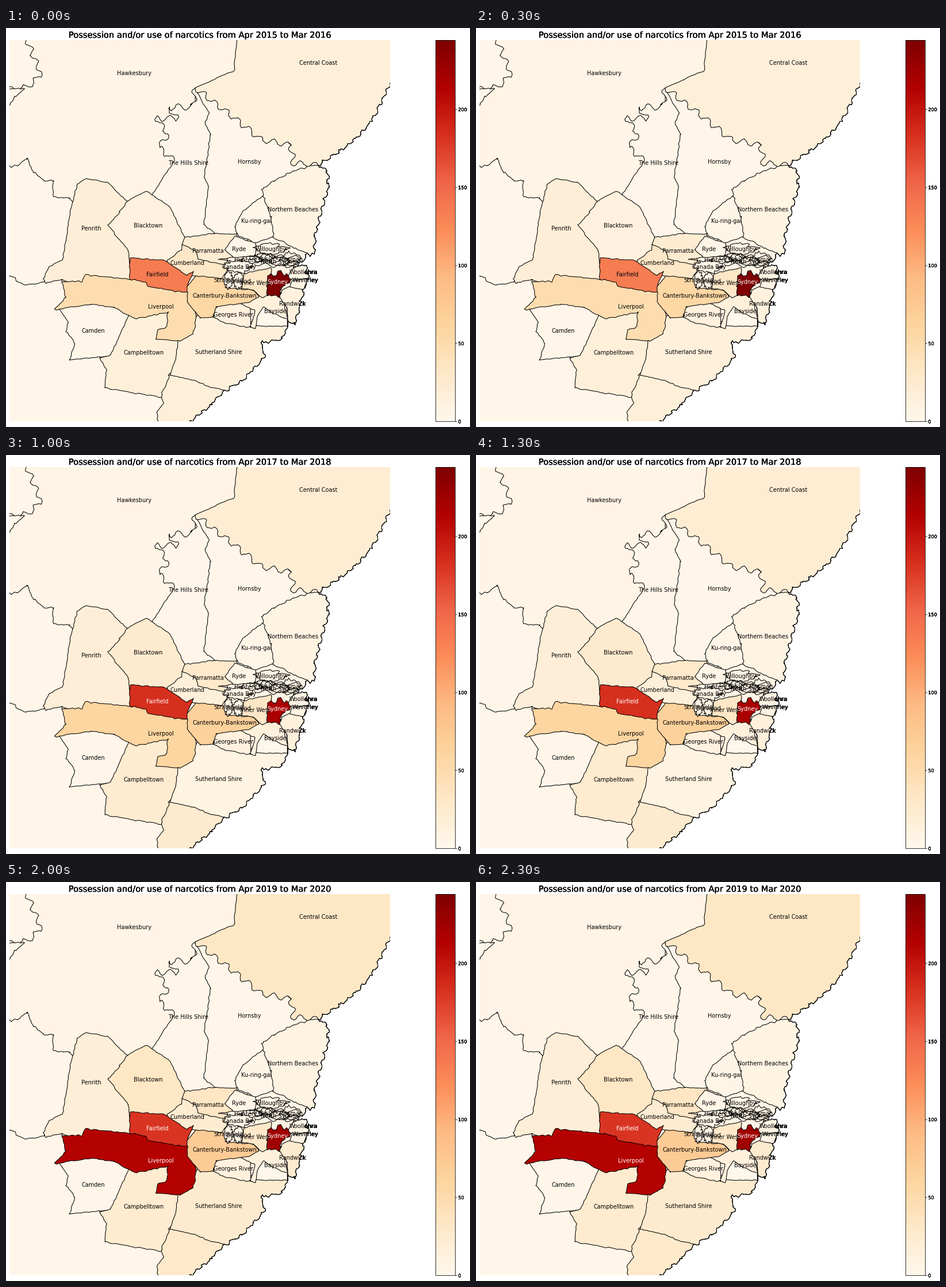
A matplotlib script that plays this animation: 807 by 694 pixels, repeating every 2500 ms.

```python
import numpy as np
import matplotlib.pyplot as plt
from matplotlib.animation import FuncAnimation
from matplotlib.cm import ScalarMappable
from matplotlib.colors import Normalize
from matplotlib.patches import Polygon
from matplotlib.patheffects import Normal

W, H, DPI = 807, 694, 100
PT = 72 / DPI  # points per pixel
TOP, BOTTOM, LEFT, RIGHT = 21, 684, 6, 668
HEAVY = [Normal()] * 4
FIRST_YEAR, YEARS = 2015, 5

plt.rcParams["font.family"] = "DejaVu Sans"
rng = np.random.default_rng(12)
norm = Normalize(0, 244.3)
cmap = plt.get_cmap("OrRd")

fig = plt.figure(figsize=(W / DPI, H / DPI), dpi=DPI, facecolor="white")


def pixel_axes(x0, x1):
    return fig.add_axes([x0 / W, 1 - BOTTOM / H, (x1 - x0) / W, (BOTTOM - TOP) / H])


ax = pixel_axes(LEFT, RIGHT)
ax.set_xlim(LEFT, RIGHT)
ax.set_ylim(BOTTOM, TOP)
ax.axis("off")
places = []


def path(*flat, jitter=0.6, step=5, wave=0, period=25):
    """Line through a few key points, roughened by noise and an optional meander."""
    keys = np.array(flat, float).reshape(-1, 2)
    dist = np.append(0, np.cumsum(np.hypot(*np.diff(keys, axis=0).T)))
    total = dist[-1]
    s = np.union1d(np.linspace(0, total, max(2, round(total / step))), dist)
    pts = np.column_stack([np.interp(s, dist, axis) for axis in keys.T])
    dx, dy = np.gradient(pts, axis=0).T
    normal = np.column_stack([-dy, dx]) / np.maximum(np.hypot(dx, dy), 1e-6)[:, None]
    turns = max(1, round(total / period))
    pts += normal * wave * np.sin(2 * np.pi * turns * s / total)[:, None]
    pts[1:-1] += rng.normal(0, jitter, (len(pts) - 2, 2))
    return pts


def shore(*flat):
    return path(*flat, jitter=1, step=3, wave=1.8, period=17)


def river(*flat, wave=5):
    return path(*flat, wave=wave, step=3)


def islet(x, y, rx, ry):
    angle = np.linspace(0, 2 * np.pi, 44)
    r = 1 + rng.normal(0, 0.13, len(angle))
    return np.column_stack([x + rx * r * np.cos(angle), y + ry * r * np.sin(angle)])


def label(name, x, y, **style):
    return ax.text(x, y + 3.7, name, ha="center", va="baseline",
                   fontsize=9.78 * PT, **style)


def place(name, spot, level, *paths):
    shape = Polygon(np.vstack(paths), closed=True, edgecolor="black",
                    linewidth=1.05 * PT, joinstyle="round", zorder=1)
    ax.add_patch(shape)
    text = None
    if name:
        label(name, *spot, zorder=0.5, path_effects=HEAVY)  # shows only over the sea
        text = label(name, *spot, zorder=3)
    places.append((shape, text, np.broadcast_to(level, YEARS)))


# Coast from north to south
north = shore(690, 85, 668, 97, 652, 130, 633, 165, 608, 193, 580, 214, 543, 239)
beaches = shore(543, 239, 559, 248, 561, 276, 549, 315, 537, 362, 536, 394, 524, 392)
head = shore(524, 392, 515, 406, 500, 417, 521, 412, 525, 436)
east = shore(525, 436, 517, 457, 511, 485, 502, 516, 490, 507)
south = shore(490, 519, 480, 541, 444, 547, 450, 572, 411, 613, 381, 630)
far_south = shore(381, 630, 357, 654, 310, 694)
coast = np.vstack([north, beaches, head, east, south, far_south])
ax.plot(*coast.T, color="black", lw=1.2 * PT, zorder=0.5, path_effects=HEAVY)

# Later places cover the loose edges of earlier ones
place("Hawkesbury", (223, 78), 6.5,
      path(-10, 10, 690, 10), coast, path(-10, 700, -10, 10))
place(None, None, 3, path(-10, 400, 97, 400, 290, 560, 290, 700, -10, 700))
place(None, None, 3, river(-10, 10, 35, 18, 46, 45, 60, 78, 48, 96, 30, 104, -10, 107))
place(None, None, 3, path(-10, 107, 32, 105, 15, 120, 6, 134, -10, 140))
place(None, None, 3,
      path(-10, 241, 20, 240, 36, 227, 48, 250, 64, 264, 82, 266, 82, 293, 110, 296,
           130, 320, 110, 430, 66, 441, 34, 447, 6, 432, -10, 430, jitter=1))
place("Hornsby", (423, 232), 3.5,
      path(329, 104, 400, 100, 528, 238, 470, 320, 420, 370, 340, 362, 330, 240))
place("The Hills Shire", (317.5, 234), 3,
      path(329, 105, 353, 148, 346, 165, 356, 185, 345, 260, 352, 275, 344, 342,
           365, 358, 376, 375, 311, 375, 253, 291, 293, 231),
      river(293, 231, 266, 208, 282, 184, 262, 157, 296, 157, 283, 138, 325, 137,
            329, 105))
place("Central Coast", (543, 60), (17, 17, 21, 30, 33),
      path(402, 10, 397, 74, 329, 104),
      river(329, 104, 380, 143, 446, 195, 495, 203, 500, 235, 543, 239),
      north[::-1], path(690, 85, 690, 10))
place("Penrith", (148, 348), 19,
      path(139, 262, 176, 268, 212, 303, 230, 340, 225, 440, 138, 450, 97, 438,
           69, 444, 66, 436, 74, 416, 98, 403, 112, 318, 124, 272, 139, 262))
place("Blacktown", (247, 343), (13, 30, 25, 27, 33),
      path(244, 284, 284, 310, 311, 364, 325, 380, 300, 420, 215, 410, 213, 388,
           178, 343, 198, 320, 212, 300, 244, 284))
place("Camden", (151.5, 526), 3.5,
      path(91, 486, 108, 512, 105, 527, 120, 548, 110, 577, 166, 572, 200, 570,
           225, 490, 160, 470, 91, 486))
place("Campbelltown", (240, 564), (17, 14, 24, 18, 24),
      path(216, 495, 182, 569, 163, 574, 175, 594, 172, 626, 272, 643, 300, 620,
           310, 540, 280, 480, 216, 495))
place(None, None, (18, 28, 26, 17, 28),
      path(282, 604, 300, 590, 381, 630), far_south,
      path(268, 700, 262, 668, 274, 651, 270, 640, 284, 605))
place("Sutherland Shire", (369.5, 563), (15, 14, 9, 13, 25),
      path(299, 545, 332, 500, 440, 512, 490, 518), south,
      path(381, 630, 348, 623, 326, 612, 286, 604, 296, 572, 299, 545))
place("Liverpool", (269, 484), (48, 40, 60, 78, 212),
      path(138, 429, 216, 437, 310, 445, 325, 475, 331, 505, 326, 531, 302, 545,
           261, 541, 264, 525, 279, 521, 282, 494, 226, 506, 187, 486, 148, 480,
           84, 490, 104, 468, 97, 441, 132, 441, 138, 429))
place("Cumberland", (315, 408), (32, 33, 16, 24, 22),
      path(306, 376, 305, 386, 280, 405, 290, 425, 331, 432, 376, 436, 390, 414,
           380, 390, 306, 376))
place("Fairfield", (263, 428), (135, 166, 184, 160, 181),
      path(216, 400, 276, 404, 314, 430, 326, 424, 316, 448, 320, 459, 290, 457,
           246, 449, 243, 442, 215, 437, 216, 400))
place(None, None, 1, path(436, 480, 488, 480, 490, 519, 430, 518, 436, 480))
place("Georges River", (395.5, 498), 12,
      path(364, 475, 404, 470, 425, 488, 426, 521, 380, 513, 361, 502, 364, 475))
place("Bayside", (468.5, 492), 14,
      path(404, 478, 452, 460, 480, 460, 490, 507, 460, 494, 448, 485, 437, 503,
           434, 523, 425, 520, 433, 492, 404, 478))
place("Randwick", (498, 479), (13, 12, 14, 24, 26),
      path(480, 456, 525, 436), east, path(490, 507, 489, 488, 476, 467, 480, 456))
place("Canterbury-Bankstown", (380, 465), (57, 57, 65, 77, 72),
      path(330, 431, 380, 436, 382, 452, 430, 456, 441, 467, 424, 477, 366, 485,
           360, 503, 338, 504, 316, 478, 315, 450, 330, 431))
place("Parramatta", (351, 387), (22, 38, 28, 28, 35),
      path(311, 364, 357, 358, 400, 358, 405, 370, 395, 399, 370, 402, 385, 404,
           382, 412, 334, 402, 331, 389, 306, 376, 311, 364))
place("Ku-ring-gai", (436, 335), 4,
      path(446, 292, 470, 300, 470, 360, 434, 374, 403, 361, 398, 345, 412, 319,
           446, 292))
place("Ryde", (405.5, 384), 5,
      path(398, 362, 434, 374, 434, 397, 395, 399, 380, 385, 398, 362))
place("Northern Beaches", (499, 315), 9, beaches,
      path(524, 391, 503, 384, 490, 375, 466, 366, 461, 328, 448, 296, 445, 279,
           466, 266, 490, 253, 526, 240, 543, 239, jitter=1))

# Councils on the harbour are ragged patches about their names
for name, x, y, rx, ry in (("Willoughby", 461, 384, 27, 9),
                           ("Lane Cove", 449, 399, 16, 7),
                           ("Hunters Hill", 426, 403, 18, 6),
                           ("Mosman", 496, 402, 17, 10),
                           ("North Sydney", 476, 406, 17, 7),
                           ("Canada Bay", 405, 415, 22, 10),
                           ("Strathfield", 387, 438, 8, 14),
                           ("Burwood", 404, 440, 9, 13)):
    place(name, (x, y), 5, islet(x, y, rx, ry))
for y in (399, 408, 415):
    inlet = river(432, y - 4, 510, y, wave=3)
    ax.plot(*inlet.T, color="black", lw=1.05 * PT, zorder=1)

place("Inner West", (433, 443), (32, 45, 32, 22, 30),
      path(414, 428, 438, 421, 462, 418, 455, 464, 446, 470, 430, 456, 410, 453,
           414, 428))
place("Woollahra", (517, 424), 8, head[len(head) // 2:],
      path(525, 436, 487, 437, 497, 420))
place("Waverley", (520, 438), 8,
      path(497, 440, 525, 436, 517, 455, 494, 451, 497, 440))
place("Sydney", (472, 441), (244, 239, 218, 230, 224),
      path(455, 436, 458, 427, 470, 430, 474, 422, 484, 431, 490, 428, 494, 438,
           480, 454, 476, 467, 454, 465, 455, 436, jitter=1.2, step=4))

cax = pixel_axes(747.3, 780.5)
bar = fig.colorbar(ScalarMappable(norm, cmap), cax=cax, ticks=range(0, 201, 50))
bar.outline.set_linewidth(0.8 * PT)
cax.tick_params(labelsize=8.15 * PT, length=2.9 * PT, width=0.8 * PT, pad=2.9 * PT)
for tick in cax.get_yticklabels():
    tick.set_path_effects(HEAVY)

title = fig.text((LEFT + RIGHT) / 2 / W, 1 - 17 / H, "", ha="center", va="baseline",
                 fontsize=14.67 * PT, path_effects=HEAVY)


def draw(i):
    year = FIRST_YEAR + i
    title.set_text(f"Possession and/or use of narcotics from Apr {year} to Mar {year + 1}")
    for shape, text, level in places:
        shape.set_facecolor(cmap(norm(level[i])))
        if text:
            text.set_color("white" if level[i] > 175 else "black")


anim = FuncAnimation(fig, draw, frames=YEARS, interval=500, repeat=True)
plt.show()
```
